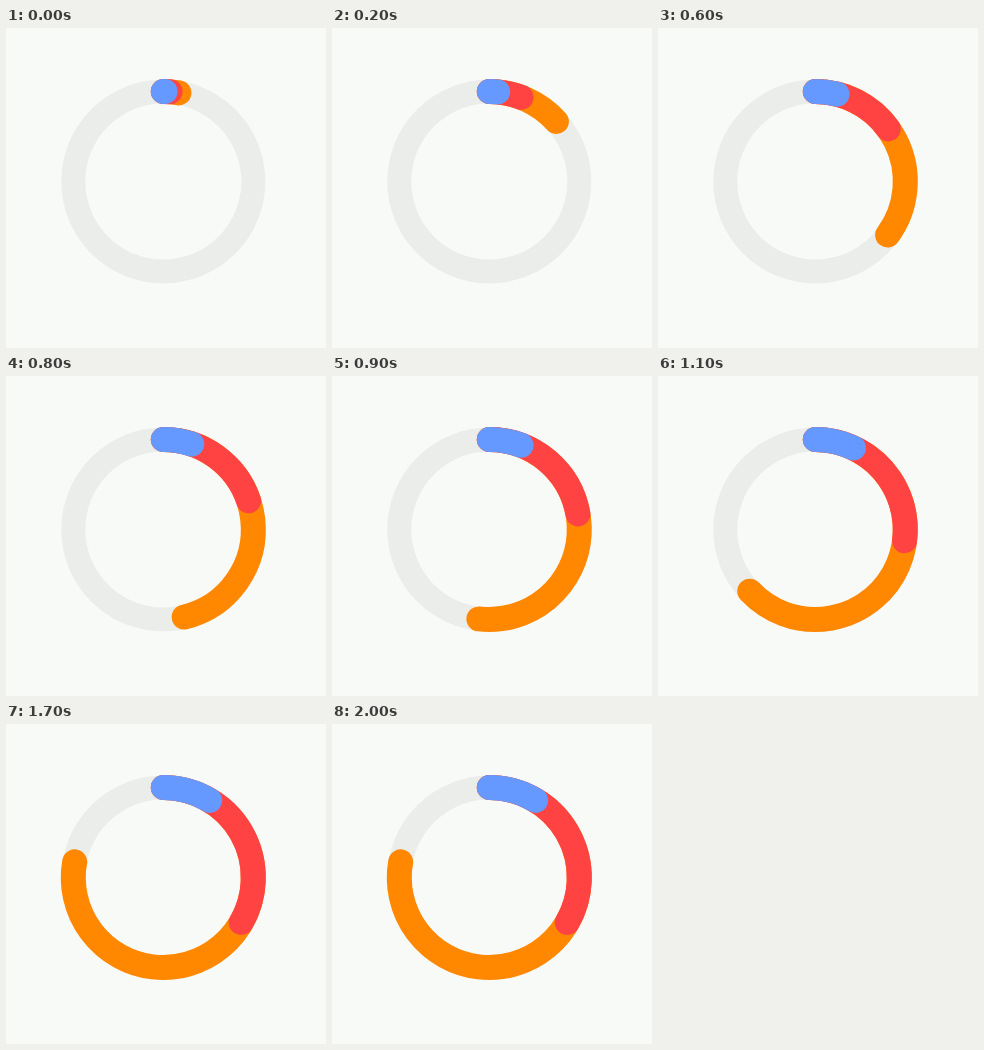
An HTML page that plays this animation: 320 px wide and 320 px high, repeating every 2.4 s.

```html
<!DOCTYPE html>
<html lang="en">
<head>
<meta charset="utf-8">
<title>Progress rings</title>
<style>
  html, body { margin: 0; width: 100%; height: 100%; overflow: hidden; background: #f8faf8; }
  svg { display: block; width: 100vw; height: 100vh; }
  circle, path { fill: none; stroke-width: 25; stroke-linecap: round; }
</style>
</head>
<body>
<svg viewBox="0 0 320 320">
  <circle cx="157.3" cy="153.5" r="90" stroke="#ebedeb" style="stroke-width:24"/>
  <path stroke="#ff8800" data-end="280"/>
  <path stroke="#ff4343" data-end="120"/>
  <path stroke="#6699ff" data-end="31"/>
</svg>
<script>
const CX = 157.3, CY = 153.5, R = 90;
const LOOP = 2400, STEP = 100;
const arcs = [...document.querySelectorAll('path')];

// Share of the full sweep: a slightly slower start, then a steady rate up to the end.
function progress(t) {
  const sweep = t < 400 ? 10 + t * 0.191 : 86.4 + (t - 400) * 0.2005;
  return Math.min(1, sweep / 280);
}

function arcPath(degrees) {
  const a = degrees * Math.PI / 180;
  const x = CX + R * Math.sin(a), y = CY - R * Math.cos(a);
  return `M${CX} ${CY - R}A${R} ${R} 0 ${degrees > 180 ? 1 : 0} 1 ${x} ${y}`;
}

function draw(now) {
  const t = Math.floor(now % LOOP / STEP) * STEP;
  for (const arc of arcs) arc.setAttribute('d', arcPath(arc.dataset.end * progress(t)));
  requestAnimationFrame(draw);
}

draw(performance.now());
</script>
</body>
</html>
```
